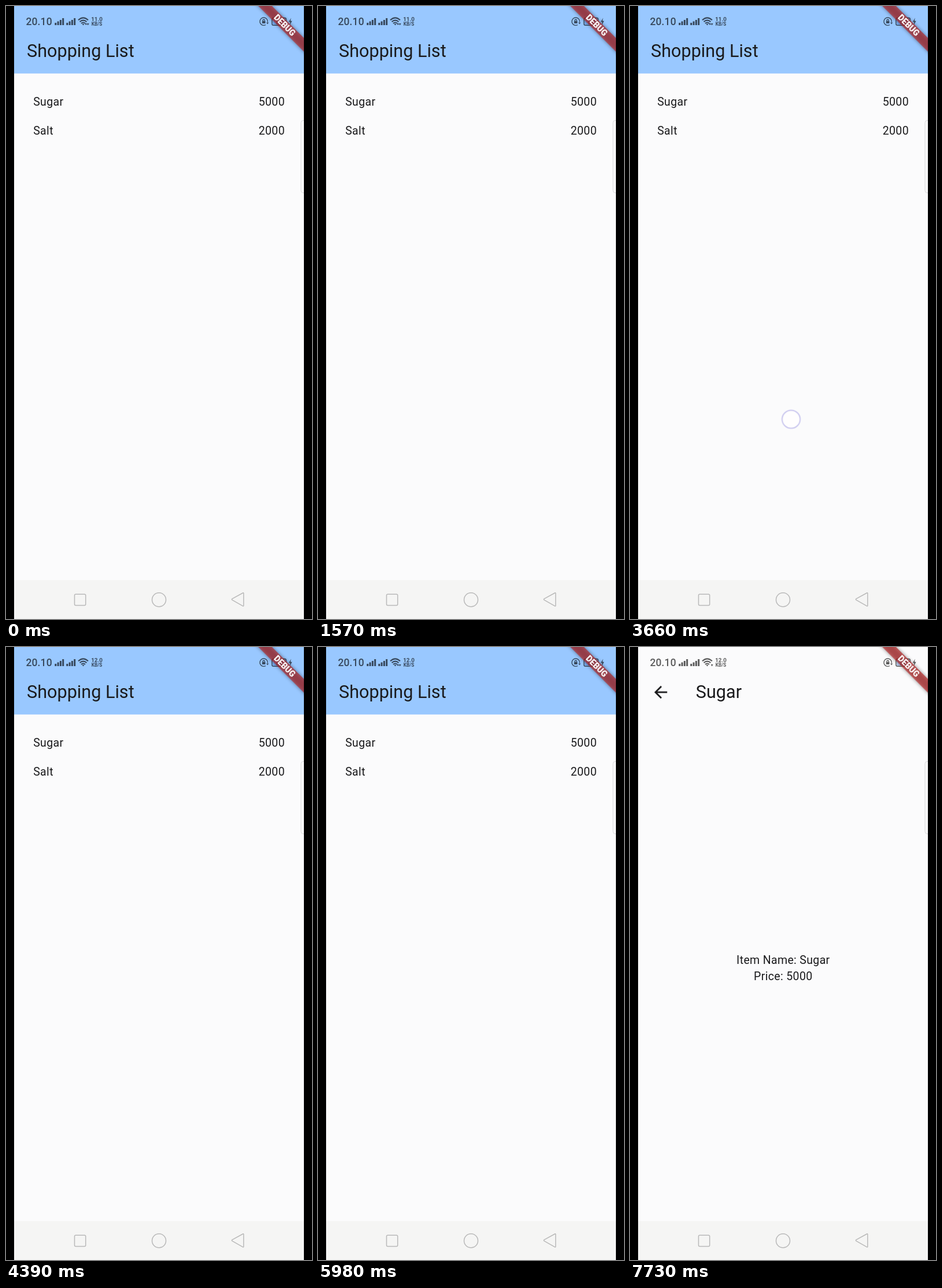
These frames come from a looping animation (529 by 1058 pixels, 8 s). An HTML page:

```html
<!DOCTYPE html>
<html lang="en">
<head>
<meta charset="utf-8">
<title>Shopping List</title>
<style>
  html, body { margin: 0; width: 100%; height: 100%; overflow: hidden; background: #000; }
  svg { display: block; width: 529px; height: 1058px; font-family: Roboto, sans-serif; fill: #1a1a1c; }
  .title { font-size: 30.6px; }
  .body { font-size: 19.5px; letter-spacing: .35px; }
  .end { text-anchor: end; }
  .mid { text-anchor: middle; }
  .status { fill: #000; opacity: .64; }
  .line { fill: none; stroke: #000; stroke-width: 1.4; }
  .wifi { stroke-width: 2.1; }
  .nav { fill: none; stroke: #b9b9b9; stroke-width: 1.5; stroke-linejoin: round; }
  .dot { fill: #fffefe; stroke: #c9c6ee; stroke-width: 2; opacity: 0; }

  .list, .detail, .old, .new, .arrows, .up { animation: 8s step-end infinite; }
  .list { animation-name: list; }
  .detail { animation-name: detail; }
  .old { animation-name: old; }
  .new { animation-name: new; }
  .arrows { animation-name: arrows; }
  .up { animation-name: up; }
  .drag { animation: drag 8s linear infinite; }
  .tap { animation: tap 8s linear infinite; }

  @keyframes list { 0% { opacity: 1 } 87.25%, 100% { opacity: 0 } }
  @keyframes detail { 0% { opacity: 0 } 87.25%, 100% { opacity: 1 } }
  @keyframes old { 0% { opacity: 1 } 49.25%, 100% { opacity: 0 } }
  @keyframes new { 0% { opacity: 0 } 49.25%, 100% { opacity: 1 } }
  @keyframes arrows { 0% { opacity: 1 } 46.75% { opacity: 0 } 67.375%, 100% { opacity: 1 } }
  @keyframes up { 0% { opacity: 1 } 96.625%, 100% { opacity: 0 } }
  @keyframes drag {
    0%, 38.75% { transform: translate(281px, 545px); opacity: 0 }
    39.5% { opacity: 1 }
    41% { transform: translate(280px, 583px) }
    45.75% { transform: translate(278.5px, 713px) }
    49.75% { transform: translate(280px, 800px) }
    52.5% { transform: translate(282px, 824px) }
    53.9% { opacity: 1 }
    54.8%, 100% { transform: translate(282px, 824px); opacity: 0 }
  }
  @keyframes tap {
    0%, 67.375% { opacity: 0 }
    68%, 73.5% { opacity: 1 }
    74.7%, 100% { opacity: 0 }
  }
</style>
</head>
<body>
<svg viewBox="0 0 529 1058">
  <defs>
    <clipPath id="screen"><rect x="14" width="501" height="1058"/></clipPath>
    <filter id="soft" x="-20%" y="-60%" width="140%" height="220%"><feGaussianBlur stdDeviation="3"/></filter>
    <g id="bars">
      <rect y="29" width="3" height="4"/>
      <rect x="4.3" y="26.5" width="3" height="6.5"/>
      <rect x="8.6" y="24" width="3" height="9"/>
      <rect x="12.9" y="21" width="3" height="12"/>
    </g>
  </defs>
  <rect width="529" height="1058" fill="#000"/>
  <g clip-path="url(#screen)">
    <rect x="14" width="501" height="1058" fill="#fbfbfc"/>

    <g class="list">
      <rect x="14" width="501" height="116.5" fill="#99c8ff"/>
      <text class="title" x="36" y="87.5">Shopping List</text>
      <g class="body">
        <text x="47.2" y="171.5">Sugar</text>
        <text class="end" x="482" y="171.5">5000</text>
        <text x="47.2" y="221.5">Salt</text>
        <text class="end" x="482" y="221.5">2000</text>
      </g>
    </g>

    <g class="detail">
      <path transform="translate(36.4 61.3) scale(1.392)" d="M20 11H7.83l5.59-5.59L12 4l-8 8 8 8 1.41-1.41L7.83 13H20z"/>
      <text class="title" x="113.8" y="87.5">Sugar</text>
      <g class="body mid">
        <text x="264.8" y="547.3">Item Name: Sugar</text>
        <text x="264.8" y="575.2">Price: 5000</text>
      </g>
    </g>

    <g class="status">
      <text x="34.5" y="33" font-size="17.5" font-weight="500" letter-spacing=".1">20.10</text>
      <use href="#bars" x="84.3"/>
      <use href="#bars" x="104.3"/>
      <path class="line wifi" d="M125 24.3q8.500-8 17 0M127.600 27.300q5.900-5.200 11.800 0M130 30q3.500-3 7 0"/>
      <path d="M131.300 30.800h4.400l-2.200 2.600z"/>
      <g class="arrows">
        <path class="up" d="M136.400 32.300l1.900-3.200 1.900 3.200z"/>
        <path d="M139.800 30h3.800l-1.900 3.600z"/>
      </g>
      <g class="mid" font-weight="700">
        <g font-size="9.8">
          <text class="old" x="157" y="25.8">11.0</text>
          <text class="new" x="157" y="25.8">12.0</text>
        </g>
        <text x="157" y="34" font-size="8.2">KB/S</text>
      </g>
      <circle class="line" cx="445.600" cy="26.700" r="6.700" stroke-dasharray="36 6" transform="rotate(60 445.600 26.700)"/>
      <path d="M450 28.600h4.200l-2.100 2.800z"/>
      <rect x="442.800" y="25.800" width="5.600" height="4.200"/>
      <path class="line" d="M443.900 25.800v-.800a1.700 1.700 0 0 1 3.400 0v.800"/>
      <rect class="line" x="459.800" y="20.500" width="24.500" height="12.800" rx="2.500"/>
      <text class="mid" x="472" y="30.800" font-size="11" font-weight="700">72</text>
      <path d="M492.800 20.500l-4 7h2.600l-1.200 6 4.400-7.800h-2.800z"/>
    </g>
    <rect x="461" y="21.600" width="22" height="10.600" rx="1.500" fill="#3d7be0" opacity=".35"/>

    <rect x="510" y="197.500" width="12" height="125" rx="4" fill="#fcfcfd" stroke="#d6d6d8"/>

    <rect x="14" y="991" width="501" height="67" fill="#f5f5f4"/>
    <g class="nav">
      <rect x="118.500" y="1015.200" width="19.200" height="19.200" rx="2"/>
      <circle cx="264.500" cy="1024.700" r="12"/>
      <path d="M391 1023.200L409.500 1013q1.300-.600 1.300.800v21q0 1.400-1.300.800L391 1025.200q-1.300-1 0-2z"/>
    </g>

    <circle class="dot drag" r="15.600"/>
    <circle class="dot tap" cx="200" cy="159.500" r="15.600"/>

    <g transform="translate(515 0) rotate(45)">
      <rect x="-70" y="39" width="140" height="16.700" fill="#000" opacity=".42" filter="url(#soft)"/>
      <rect x="-70" y="39" width="140" height="16.700" fill="#b71c1c" opacity=".63"/>
      <text class="mid" y="52.300" font-size="14.200" font-weight="900" fill="#fff">DEBUG</text>
    </g>
  </g>
</svg>
</body>
</html>
```
